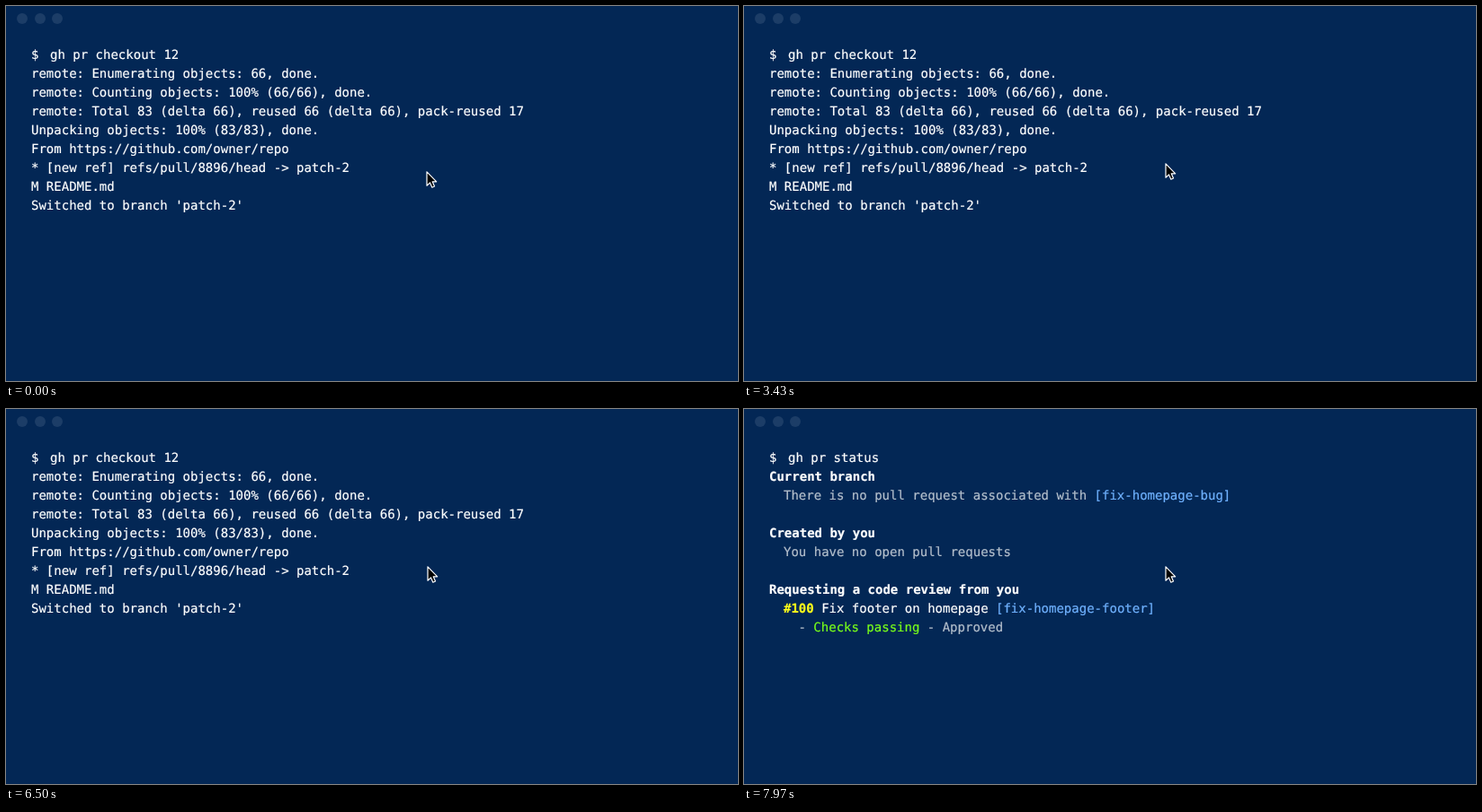
An HTML page that plays this animation: 814x418 px, repeating every 8 s.

```html
<!DOCTYPE html>
<html lang="en">
<head>
<meta charset="utf-8">
<title>Terminal</title>
<style>
  html, body { margin: 0; width: 100%; height: 100%; overflow: hidden; background: #032755; }
  svg { display: block; width: 814px; height: 418px; }
  text {
    font: 14px "DejaVu Sans Mono", monospace;
    fill: #fff; stroke: #fff; stroke-width: .2px;
    white-space: pre; text-rendering: geometricPrecision;
  }
  .bold { font-weight: bold; }
  .muted { fill: #b4bfcc; stroke: #b4bfcc; }
  .branch { fill: #70b2ff; stroke: #70b2ff; }
  .number { fill: #ffff1a; stroke: #ffff1a; font-weight: bold; }
  .passing { fill: #79ff1a; stroke: #79ff1a; }
</style>
</head>
<body>
<svg viewBox="0 0 814 418">
  <rect width="814" height="418" fill="#032755"/>
  <g fill="#1c3d67">
    <circle cx="18" cy="14" r="6"/>
    <circle cx="38" cy="14" r="6"/>
    <circle cx="57" cy="14" r="6"/>
  </g>
  <text x="28" y="59">$</text>
  <text id="command" x="49" y="59"></text>
  <g id="checkout"></g>
  <g id="status"></g>
  <path id="pointer" d="M.7 1V16.4L4.2 13.1L6.5 18.4L9.2 17.2L6.9 12H11.4Z"
        stroke="#fff" stroke-width="1.2" stroke-linejoin="round"/>
</svg>
<script>
const LOOP = 8000, CLEAR = 6570, TYPE_START = 6717, TYPE_STEP = 53, STATUS = 7600;
const MOVE_START = 30, MOVE_TIME = 250;
const byId = id => document.getElementById(id);
const command = byId('command'), checkout = byId('checkout');
const status_ = byId('status'), pointer = byId('pointer');

// Each span is [text, class]; rows count down from the prompt.
function addLine(group, row, x, ...spans) {
  const make = name => document.createElementNS(group.namespaceURI, name);
  const line = make('text');
  line.setAttribute('x', x);
  line.setAttribute('y', 59 + 21 * row);
  for (const [text, style = ''] of spans) {
    const span = make('tspan');
    span.textContent = text;
    span.setAttribute('class', style);
    line.append(span);
  }
  group.append(line);
}

[
  'remote: Enumerating objects: 66, done.',
  'remote: Counting objects: 100% (66/66), done.',
  'remote: Total 83 (delta 66), reused 66 (delta 66), pack-reused 17',
  'Unpacking objects: 100% (83/83), done.',
  'From https://github.com/owner/repo',
  '* [new ref] refs/pull/8896/head -> patch-2',
  'M README.md',
  "Switched to branch 'patch-2'"
].forEach((text, i) => addLine(checkout, i + 1, 28, [text]));

addLine(status_, 1, 28, ['Current branch', 'bold']);
addLine(status_, 2, 44, ['There is no pull request associated with ', 'muted'], ['[fix-homepage-bug]', 'branch']);
addLine(status_, 4, 28, ['Created by you', 'bold']);
addLine(status_, 5, 44, ['You have no open pull requests', 'muted']);
addLine(status_, 7, 28, ['Requesting a code review from you', 'bold']);
addLine(status_, 8, 44, ['#100', 'number'], [' Fix footer on homepage '], ['[fix-homepage-footer]', 'branch']);
addLine(status_, 9, 60.5, ['- ', 'muted'], ['Checks passing', 'passing'], [' - Approved', 'muted']);

const show = (element, visible) => element.setAttribute('visibility', visible ? 'visible' : 'hidden');

function draw(time) {
  const t = time % LOOP;
  const typed = Math.max(0, Math.floor((t - TYPE_START) / TYPE_STEP) + 1);
  command.textContent = t < CLEAR ? 'gh pr checkout 12' : 'gh pr status'.slice(0, typed);
  show(checkout, t < CLEAR);
  show(status_, t >= STATUS);

  const progress = Math.min(1, Math.max(0, (t - MOVE_START) / MOVE_TIME));
  const eased = 1 - (1 - progress) ** 2;
  pointer.setAttribute('transform', `translate(${467.3 + eased} ${183.8 - 9 * eased})`);
}

const start = performance.now();
function frame() {
  draw(performance.now() - start);
  requestAnimationFrame(frame);
}
frame();
</script>
</body>
</html>
```
